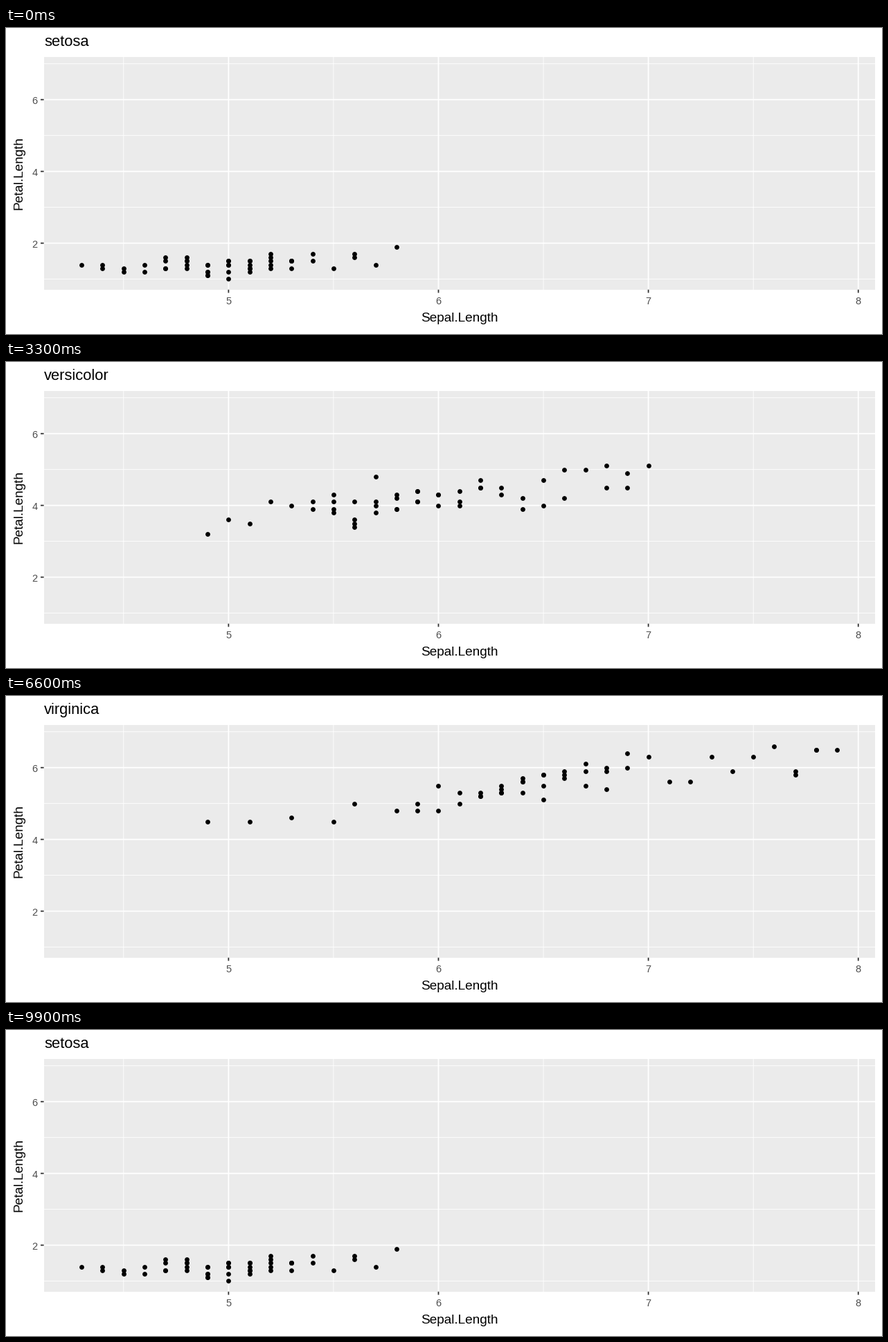
A matplotlib script that plays this animation: 1265x443 px, repeating every 10000 ms.

```python
import numpy as np
import matplotlib.pyplot as plt
from matplotlib.animation import FuncAnimation
from matplotlib.patches import Rectangle

W, H, DPI = 1265, 443, 120
LEFT, RIGHT, TOP, BOTTOM = 54.6, 1255.0, 41.6, 378.8   # panel edges in pixels
X_LIM, Y_LIM = (4.12, 8.08), (0.705, 7.195)
MAJOR, MINOR, TICK = 1.8, 0.9, 4.6                     # line sizes in pixels
FRAMES, INTERVAL = 100, 100
FIRST_MOVE, STEPS, PERIOD = 19, 14, 33                 # timing in frames
POINTS = 50
QUANTILES = [0, 0.1, 0.25, 0.5, 0.75, 0.9, 1]

plt.rcParams["font.family"] = "Liberation Sans"
rng = np.random.default_rng(7)


def cloud(x_keys, y_mean, slope, spread, y_range):
    """Points along a trend: x follows its quantiles, y scatters around the line."""
    x = np.interp(np.linspace(0, 1, POINTS), QUANTILES, x_keys)
    y = y_mean + slope * (x - x.mean()) + rng.normal(0, spread, POINTS)
    points = np.column_stack([x, np.clip(y, *y_range)]).round(1)
    return rng.permutation(points)


states = [
    ("setosa", cloud([4.3, 4.6, 4.8, 5.0, 5.2, 5.4, 5.8],
                     1.46, 0.13, 0.17, (1.0, 1.9))),
    ("versicolor", cloud([4.9, 5.4, 5.6, 5.9, 6.3, 6.7, 7.0],
                         4.26, 0.69, 0.31, (3.0, 5.1))),
    ("virginica", cloud([4.9, 5.8, 6.2, 6.5, 6.9, 7.6, 7.9],
                        5.55, 0.75, 0.28, (4.5, 6.9))),
]


def px(x):
    return LEFT + (x - X_LIM[0]) / (X_LIM[1] - X_LIM[0]) * (RIGHT - LEFT)


def py(y):
    return BOTTOM - (y - Y_LIM[0]) / (Y_LIM[1] - Y_LIM[0]) * (BOTTOM - TOP)


fig = plt.figure(figsize=(W / DPI, H / DPI), dpi=DPI, facecolor="white")
ax = fig.add_axes([0, 0, 1, 1])
ax.set_xlim(0, W)
ax.set_ylim(H, 0)
ax.axis("off")


def box(x0, y0, x1, y1, color, snap=False):
    ax.add_patch(Rectangle((x0, y0), x1 - x0, y1 - y0,
                           color=color, lw=0, snap=snap))


def vline(x, y0, y1, width, color="white"):
    box(x - width / 2, y0, x + width / 2, y1, color)


def hline(y, x0, x1, width, color="white"):
    box(x0, y - width / 2, x1, y + width / 2, color)


def label(x, y, text, size, color="black", ha="center", rotation=0):
    return ax.text(x, y, text, fontsize=size, color=color, ha=ha,
                   va="baseline", rotation=rotation, rotation_mode="anchor")


box(LEFT, TOP, RIGHT, BOTTOM, "#EBEBEB", snap=True)

# Minor grid below the major one
for x in np.arange(4.5, 8):
    vline(px(x), TOP, BOTTOM, MINOR)
for y in range(1, 8, 2):
    hline(py(y), LEFT, RIGHT, MINOR)
for x in range(5, 9):
    vline(px(x), TOP, BOTTOM, MAJOR)
    vline(px(x), BOTTOM, BOTTOM + TICK, MAJOR, "#333333")
    label(px(x), 400, str(x), 8.8, "#4D4D4D")
for y in range(2, 7, 2):
    hline(py(y), LEFT, RIGHT, MAJOR)
    hline(py(y), LEFT - TICK, LEFT, MAJOR, "#333333")
    label(41.3, py(y) + 6, str(y), 8.8, "#4D4D4D")

label((LEFT + RIGHT) / 2, 425, "Sepal.Length", 11.4)
label(24, (TOP + BOTTOM) / 2, "Petal.Length", 11.4, rotation=90)
title = label(55, 26, "", 13.2, ha="left")
dots = ax.scatter([], [], s=4.1 ** 2, c="black", linewidths=0, zorder=3)


def draw(frame):
    # Move linearly to the next state, then hold it
    k, step = divmod(frame - FIRST_MOVE, PERIOD)
    t = min(step / STEPS, 1)
    (name_a, a), (name_b, b) = states[k % 3], states[(k + 1) % 3]
    x, y = (a + (b - a) * t).T
    dots.set_offsets(np.round(np.column_stack([px(x), py(y)])))
    title.set_text(name_b if t > 0.5 else name_a)
    return dots, title


anim = FuncAnimation(fig, draw, frames=FRAMES, interval=INTERVAL,
                     repeat=True, repeat_delay=0, blit=False)
plt.show()
```
